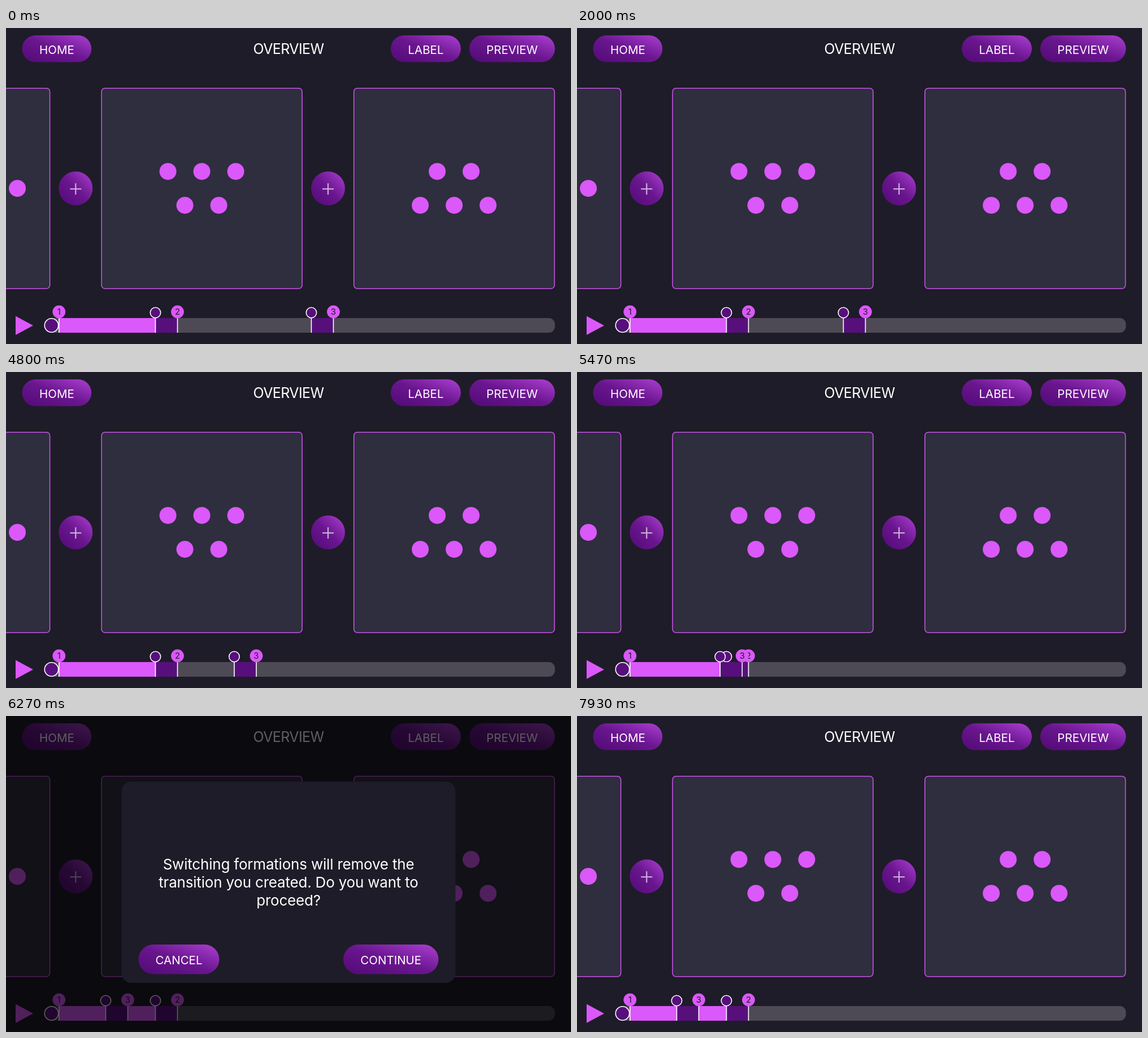
Recreate the animation shown at these times as an HTML page with a canvas. Size 1000 by 560 pixels, loop 8 s.

```html
<!DOCTYPE html>
<html lang="en">
<head>
<meta charset="utf-8">
<title>Overview</title>
<style>
html, body { margin: 0; width: 100%; height: 100%; overflow: hidden; background: #1e1c28; }
canvas { display: block; width: 1000px; height: 560px; }
</style>
</head>
<body>
<canvas id="stage"></canvas>
<script>
const W = 1000, H = 560, LOOP = 8000;
const BG = '#1e1c28', PANEL = '#2e2e3e', PINK = '#db58fa', DARK = '#570f7c';
const canvas = document.getElementById('stage');
const ctx = canvas.getContext('2d');
const dpr = window.devicePixelRatio || 1;
canvas.width = W * dpr;
canvas.height = H * dpr;

// Time and position of the dragged marker
const DRAG = [[0, 579.5], [2000, 510.5], [4800, 443], [5900, 215.5]];
const OPEN = 6000, PRESS = 6990, RELEASE = 7200, CLOSE = 7230, SLIDE = 300;

const clamp = v => Math.min(1, Math.max(0, v));
const ramp = (t, start, length) => clamp((t - start) / length);
const smooth = p => p * p * (3 - 2 * p);

function dragX(t) {
  const i = DRAG.findIndex(k => k[0] > t);
  if (i < 0) return DRAG[DRAG.length - 1][1];
  const [t0, x0] = DRAG[i - 1], [t1, x1] = DRAG[i];
  const p = (t - t0) / (t1 - t0);
  return x0 + (x1 - x0) * (i === DRAG.length - 1 ? smooth(p) : p);
}

function box(x, y, w, h, r, fill, stroke) {
  ctx.beginPath();
  ctx.roundRect(x, y, w, h, r);
  paint(fill, stroke);
}

function disc(x, y, r, fill, stroke) {
  ctx.beginPath();
  ctx.arc(x, y, r, 0, Math.PI * 2);
  paint(fill, stroke);
}

function paint(fill, stroke) {
  ctx.fillStyle = fill;
  ctx.fill();
  if (!stroke) return;
  ctx.strokeStyle = stroke;
  ctx.lineWidth = 1.6;
  ctx.stroke();
}

function line(x0, y0, x1, y1, color, width) {
  ctx.beginPath();
  ctx.moveTo(x0, y0);
  ctx.lineTo(x1, y1);
  ctx.strokeStyle = color;
  ctx.lineWidth = width;
  ctx.stroke();
}

function label(text, x, base, size, color = '#fff', spacing = 0) {
  ctx.font = `${size}px Inter, "Liberation Sans", sans-serif`;
  ctx.letterSpacing = spacing + 'px';
  ctx.textAlign = 'center';
  ctx.fillStyle = color;
  ctx.fillText(text, x, base);
}

// Corner to corner gradient with bands parallel to the other diagonal
function sheen(x, y, w, h) {
  const k = w * h / (w * w + h * h), cx = x + w / 2, cy = y + h / 2;
  const g = ctx.createLinearGradient(cx + h * k, cy - w * k, cx - h * k, cy + w * k);
  g.addColorStop(0, '#ad40d2');
  g.addColorStop(0.5, '#6a168f');
  g.addColorStop(1, '#520a76');
  return g;
}

function button(text, x, y, w, h) {
  box(x, y, w, h, h / 2, sheen(x, y, w, h));
  label(text, x + w / 2, y + h / 2 + 9, 20.5);
}

function plus(x, y) {
  disc(x, y, 30, sheen(x - 30, y - 30, 60, 60));
  line(x - 10, y + 1, x + 10, y + 1, '#cbb0d8', 2.2);
  line(x, y - 9, x, y + 11, '#cbb0d8', 2.2);
}

function panel(x, dots) {
  box(x, 106.7, 355, 355, 6, PANEL, '#c752e6');
  for (const [dx, dy] of dots) disc(x + 177.5 + dx, 284.2 + dy, 15, PINK);
}

function stem(x) {
  line(x, 513, x, 540, '#fff', 1.6);
}

function marker(x, n) {
  stem(x);
  disc(x, 503, 11.4, PINK);
  label(n, x, 508.3, 15, BG);
}

function transition(x, n) {
  ctx.fillStyle = DARK;
  ctx.fillRect(x - 39, 514, 39, 26);
  stem(x - 39);
  disc(x - 39, 504.5, 9.2, DARK, '#fff');
  marker(x, n);
}

function timeline(t) {
  ctx.beginPath();
  ctx.moveTo(17, 510.5);
  ctx.lineTo(48, 527.3);
  ctx.lineTo(17, 544);
  ctx.closePath();
  paint(PINK);
  box(70, 514, 901.5, 26, 11, '#4d4a56');
  ctx.fillStyle = PINK;
  ctx.fillRect(94, 514, 171, 26);
  disc(80.5, 527, 12.2, DARK, '#fff');
  marker(93.8, '1');
  transition(303.5, '2');
  transition(dragX(t), '3');
}

function overview(t) {
  ctx.fillStyle = BG;
  ctx.fillRect(0, 0, W, H);
  button('HOME', 28.5, 13, 122.7, 47.6);
  button('LABEL', 681, 13, 124, 47.6);
  button('PREVIEW', 820, 13, 151.5, 47.6);
  label('OVERVIEW', 500, 45.8, 25, '#fff', -0.6);
  panel(-277.4, [[120, 0]]);
  panel(169.1, [[-60, -30], [0, -30], [60, -30], [-30, 30], [30, 30]]);
  panel(615.7, [[-30, -30], [30, -30], [-60, 30], [0, 30], [60, 30]]);
  plus(123.3, 284.2);
  plus(570, 284.2);
  timeline(t);
}

function dialog(t) {
  const fade = ramp(t, OPEN, SLIDE) - ramp(t, CLOSE, SLIDE);
  if (fade <= 0) return;
  ctx.fillStyle = `rgba(0, 0, 0, ${0.7 * fade})`;
  ctx.fillRect(0, 0, W, H);

  const shown = smooth(ramp(t, OPEN, SLIDE)) - smooth(ramp(t, CLOSE, SLIDE));
  ctx.save();
  ctx.translate(0, H * (1 - shown));
  box(204.5, 101.5, 591, 356.5, 17, BG);
  ['Switching formations will remove the',
   'transition you created. Do you want to',
   'proceed?'].forEach((s, i) => label(s, 500, 257 + i * 32.4, 26, '#fff', -0.2));
  button('CONTINUE', 597, 390.3, 168.5, 52.5);
  const press = smooth(ramp(t, PRESS, 150)) - smooth(ramp(t, RELEASE, 250));
  ctx.globalAlpha = 1 - 0.78 * press;
  button('CANCEL', 234.5, 390.3, 143, 52.5);
  ctx.restore();
}

function frame() {
  const t = performance.now() % LOOP;
  ctx.setTransform(dpr, 0, 0, dpr, 0, 0);
  overview(t);
  dialog(t);
  requestAnimationFrame(frame);
}
frame();
</script>
</body>
</html>
```
